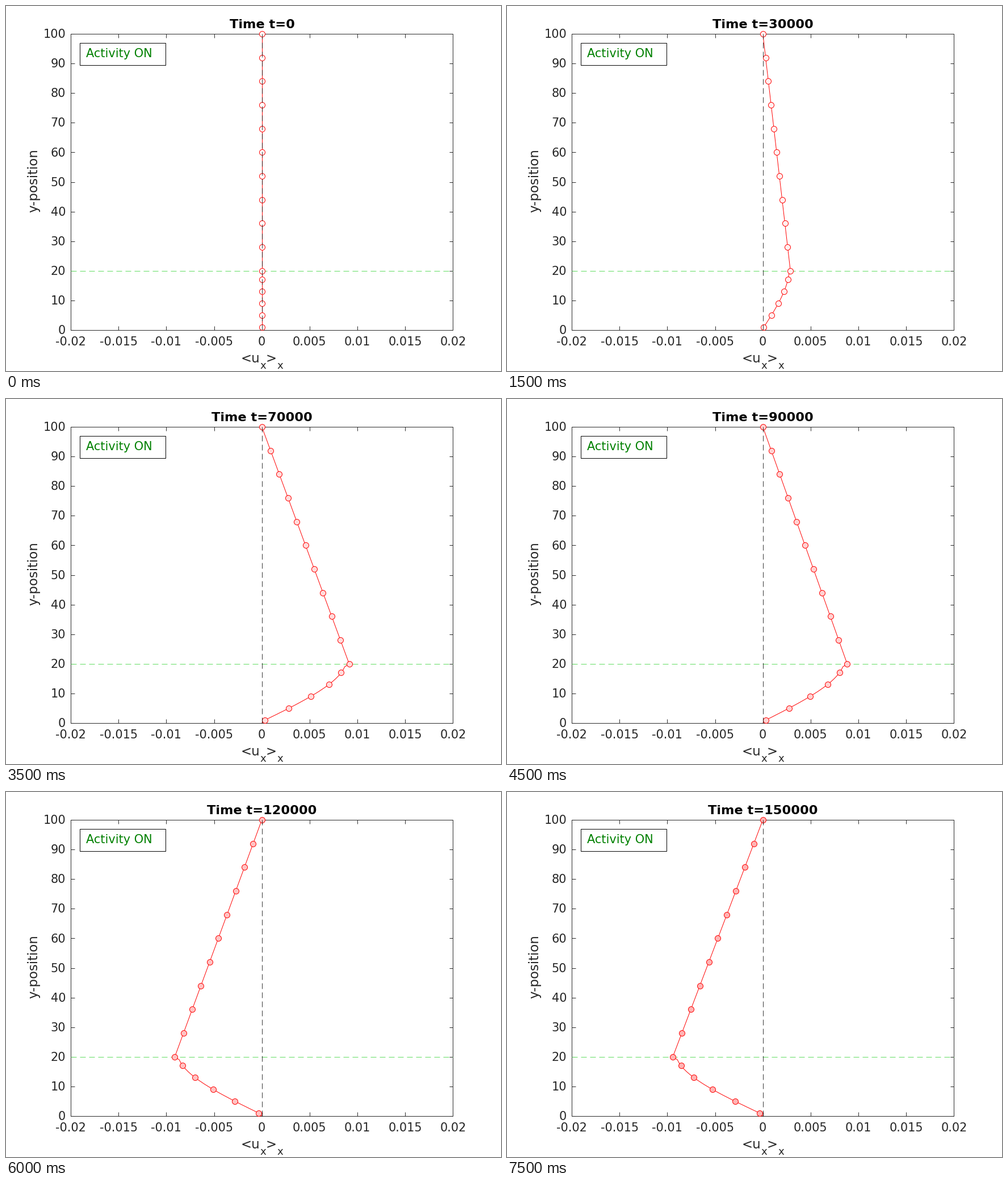
A matplotlib script for the animation above (8000 ms loop, 872 by 642 pixels).

```python
import numpy as np
import matplotlib.pyplot as plt
from matplotlib.animation import FuncAnimation
from matplotlib.patches import Rectangle

W, H, DPI = 872, 642, 100
LEFT, RIGHT, TOP, BOTTOM = 114, 787.4, 49, 570
PT = 72 / DPI
LW = 0.7
INK = "#262626"
TICK = 6.7

STEPS = 16
OFF_START, OFF_END = 10, 11
LAYER = 20        # height of the active layer
RECOIL = -0.00083

plt.rcParams["font.family"] = "DejaVu Sans"

heights = np.arange(0, 101)
marks = np.r_[1:18:4, LEVEL:101:8] if (LEVEL := LAYER) else None


def px(u):
    return LEFT + (u + 0.02) / 0.04 * (RIGHT - LEFT)


def py(y):
    return BOTTOM - y / 100 * (BOTTOM - TOP)


def surge(k, level, overshoot):
    """Logistic rise to a level, with a passing overshoot."""
    rise = lambda t: 1 / (1 + np.exp(-1.35 * (t - 3.55)))
    bump = np.exp(-((k - 5.1) / 1.5) ** 2)
    return (rise(k) - rise(0)) * (level + overshoot * bump)


def driven(y):
    """Curved flow inside the layer, linear shear above it."""
    s = np.clip((y - 0.5) / (LAYER - 0.5), 0, None)
    return np.where(y < LAYER, s * (1.36 - 0.4 * s**2), (100 - y) / (100 - LAYER))


def relaxed(y):
    t = np.clip((y - LAYER) / (100 - LAYER), 0, 1)
    return np.where(y < LAYER, y / LAYER, 1 - t**1.7)


def velocity(i):
    if i <= OFF_START:
        return surge(i, 0.0089, 0.002) * driven(heights)
    if i <= OFF_END:
        return RECOIL * relaxed(heights)
    return -surge(i - 7, 0.0095, 0.001) * driven(heights)


fig = plt.figure(figsize=(W / DPI, H / DPI), dpi=DPI, facecolor="white")
ax = fig.add_axes([0, 0, 1, 1])
ax.set_xlim(0, W)
ax.set_ylim(H, 0)
ax.axis("off")


def label(x, y, s, size=20.83, color=INK, ha="center", **kw):
    return ax.text(x, y, s, fontsize=size * PT, color=color, ha=ha,
                   va="baseline", **kw)


def line(xs, ys, color=INK, **kw):
    return ax.plot(xs, ys, color=color, lw=LW, solid_capstyle="butt",
                   dash_capstyle="butt", **kw)[0]


ax.add_patch(Rectangle((LEFT, TOP), RIGHT - LEFT, BOTTOM - TOP,
                       fill=False, ec=INK, lw=LW, zorder=1))
for u in np.arange(-4, 5) * 0.005:
    x = px(u)
    line([x, x], [BOTTOM, BOTTOM - TICK])
    line([x, x], [TOP, TOP + TICK])
    label(x, 597.3, f"{u:g}")
for v in range(0, 101, 10):
    y = py(v)
    line([LEFT, LEFT + TICK], [y, y])
    line([RIGHT, RIGHT - TICK], [y, y])
    label(105, y + 7.2, str(v), ha="right")

label(55, 307.4, "y-position", 22.9, rotation=90, rotation_mode="anchor")
for x, y, s, size in [(413.4, 627, "<u", 22.9), (447.2, 638, "x", 18.3),
                      (458, 627, ">", 22.9), (477.2, 638, "x", 18.3)]:
    label(x, y, s, size, ha="left")

title = label(451, 39, "", 22.5, "black", weight="bold")
box = ax.add_patch(Rectangle((130, 65), 151, 39, fc="white", ec="black",
                             lw=LW, zorder=4))
status = label(141, 90, "", ha="left", zorder=5)

curve = line([], [], "red", zorder=3)
dots = ax.plot([], [], "o", ms=10 * PT, mec="red", mew=LW, zorder=3.5)[0]
dash = (0, (10 / LW * PT, 6 / LW * PT))
line([LEFT, RIGHT], [py(LAYER)] * 2, "#5fdc5f", ls=dash, zorder=2)
line([px(0)] * 2, [BOTTOM, TOP], "black", ls=dash, zorder=3.8, alpha=0.8)


def update(i):
    u = velocity(i)
    curve.set_data(px(u), py(heights))
    dots.set_data(px(u[marks]), py(marks))
    fade = 1 - i / 50
    dots.set_markerfacecolor((1, fade, fade))
    title.set_text(f"Time t={i * 10000}")
    off = OFF_START <= i <= OFF_END
    status.set_text("Activity OFF" if off else "Activity ON")
    status.set_color("red" if off else "#008000")
    box.set_width(160 if off else 151)
    return curve, dots, title, status, box


anim = FuncAnimation(fig, update, frames=STEPS, interval=500,
                     repeat=True, repeat_delay=0)
plt.show()
```
